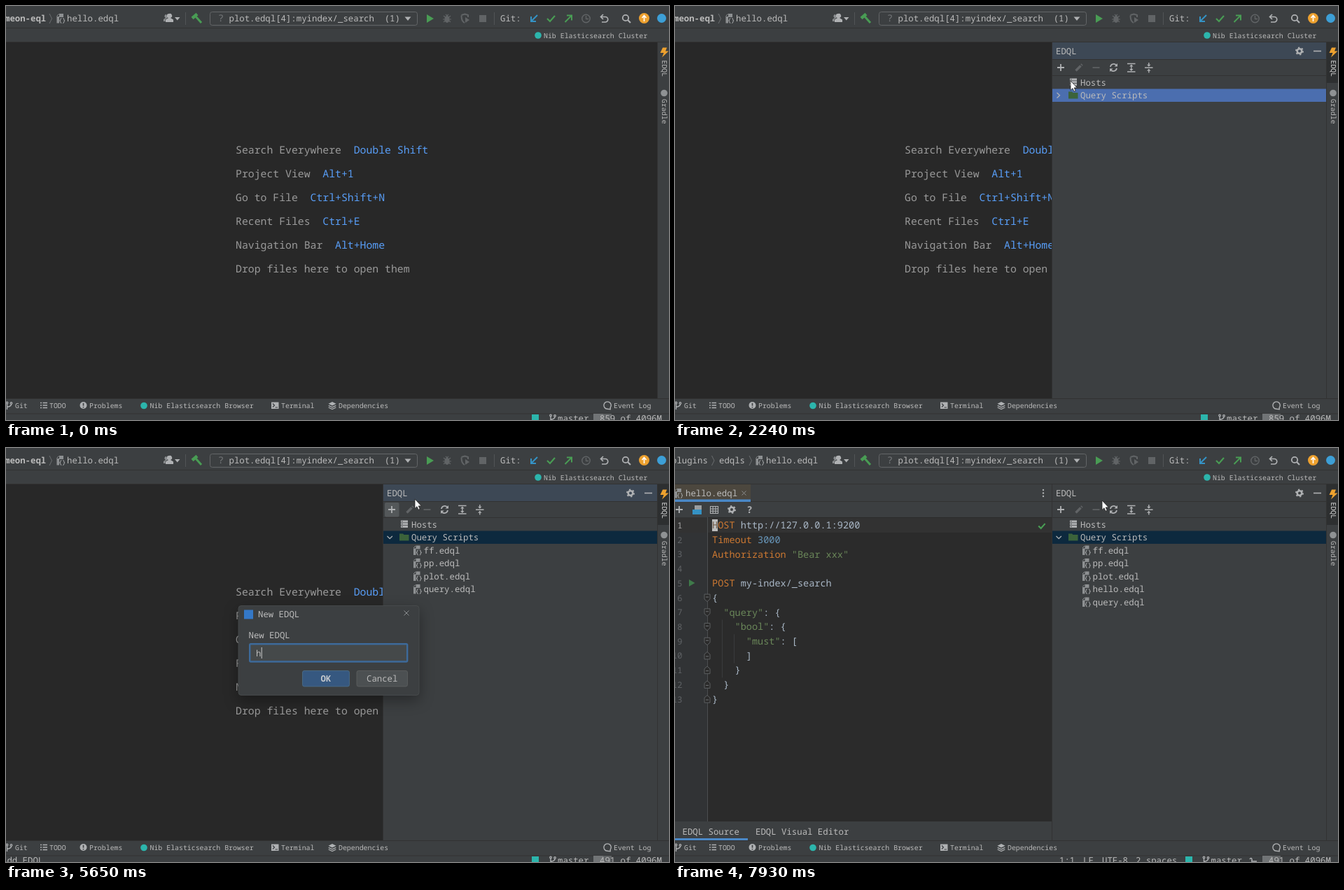
Write an HTML page that moves like this. It is 947 px wide and 592 px high and loops after 8 s.

```html
<!DOCTYPE html>
<html lang="en">
<head>
<meta charset="utf-8">
<title>EDQL tool window</title>
<style>
html, body { margin: 0; width: 100%; height: 100%; overflow: hidden; background: #3c3f41; }
svg { display: block; width: 100%; height: 100%; }
text { font-family: "Noto Sans Mono", "DejaVu Sans Mono", monospace; white-space: pre; text-rendering: geometricPrecision; }
#dialog { filter: drop-shadow(0 7px 10px rgba(0,0,0,.35)); }
</style>
</head>
<body>
<svg id="stage" viewBox="0 0 947 592" xmlns="http://www.w3.org/2000/svg"></svg>
<script>
const LOOP = 8000;
const BAR = '#3c3f41', LINE = '#323232', FG = '#bbbbbb', ICON = '#afb1b3', DIM = '#616466',
      GREEN = '#499c54', BLUE = '#3592c4', LINK = '#589df6', ACCENT = '#4a88c7', TEAL = '#2cb5ac';
const UI = 12.35, SMALL = 9.9, HINT = 14.8, CODE = 13.55;

const text = (x, y, s, fill = FG, size = UI, extra = '') =>
  `<text x="${x}" y="${y}" fill="${fill}" font-size="${size}" ${extra}>${s}</text>`;
const rect = (x, y, w, h, fill, extra = '') =>
  `<rect x="${x}" y="${y}" width="${w}" height="${h}" fill="${fill}" ${extra}/>`;
const fillPath = (d, fill = ICON) => `<path d="${d}" fill="${fill}"/>`;
const line = (d, color = ICON, w = 1.5) => `<path d="${d}" fill="none" stroke="${color}" stroke-width="${w}"/>`;
const dot = (x, y, r, fill, extra = '') => `<circle cx="${x}" cy="${y}" r="${r}" fill="${fill}" ${extra}/>`;
const ring = (x, y, r, color = ICON, w = 1.5) => dot(x, y, r, 'none', `stroke="${color}" stroke-width="${w}"`);
const group = (id, ...parts) => `<g id="${id}">${parts.join('')}</g>`;
const at = (x, y, ...parts) => `<g transform="translate(${x} ${y})">${parts.join('')}</g>`;

const plus = (x, y, c = ICON) => line(`M${x - 5} ${y}h10M${x} ${y - 5}v10`, c, 1.8);
const cross = (x, y, r = 3.5) => line(`M${x - r} ${y - r}l${2 * r} ${2 * r}m0 ${-2 * r}l${-2 * r} ${2 * r}`, '#8c8f91', 1);
const check = (x, y, s = 1) => line(`M${x - 5 * s} ${y}l${4 * s} ${4 * s}l${7 * s} ${-8 * s}`, GREEN, 2.2);
const crumb = x => line(`M${x} 11l3.5 7l-3.5 7`, '#6b6e70', 1);
const gear = (x, y) => ring(x, y, 3.3, ICON, 2.6) +
  `<circle cx="${x}" cy="${y}" r="5" fill="none" stroke="${ICON}" stroke-width="2" stroke-dasharray="2.2 3.036"/>`;
const branch = (x, y) => ring(x, y - 3.5, 1.3, ICON, 1.2) + ring(x + 6, y - 3, 1.3, ICON, 1.2) +
  line(`M${x} ${y - 2}v8M${x + 6} ${y - 1.5}q0 3 -6 4`, ICON, 1.4);
const file = (x, y) => at(x, y,
  fillPath('M4 0H10V5H4V13.500H0.500V4H4Z', '#8d9092'), line('M0.500 3.500l3 -3', '#8d9092', 1),
  line('M7.300 6.500q-1.500 0 -1.500 1.900t-1.200 1.600q1.200 0 1.200 1.700t1.500 1.900M9.300 6.500q1.500 0 1.500 1.900t1.200 1.600q-1.200 0 -1.200 1.700t-1.500 1.900', ICON, 1));
const branchLabel = (x, lock) => branch(x, 589) + text(x + 10, 594, 'master') +
  (lock ? line('M824 591v-3q-1 -3 -3 0M823 591h8', ICON, 1.5) : '');

function topBar() {
  return [
    rect(0, 0, 947, 592, BAR), rect(0, 31, 947, 1, LINE), rect(0, 51, 947, 1, LINE),
    at(225, 11, fillPath('M8 0a3 3 0 0 1 2 6l4 2.500v3.500H3v-3.500l4 -2.500a3 3 0 0 1 1 -6Z'),
      fillPath('M4 1a2.600 2.600 0 0 0 -1 5l-3 2v3h2.500v-3l3 -2Z', '#8b8e90')),
    fillPath('M241 16h7.500l-3.750 4.500Z'),
    rect(256, 9, 1, 18, '#515456'), rect(697, 9, 1, 18, '#515456'),
    line('M271 15l8 9', GREEN, 3), line('M266 17.500l7 -6', GREEN, 4.5),
    rect(291.5, 8.5, 296, 19, BAR, 'rx="3" stroke="#646668"'),
    text(303, 22, '?', '#777a7c', UI + 1), text(318.5, 22, 'plot.edql[4]:myindex/_search  (1)'),
    fillPath('M569.500 15.500h9l-4.500 5.500Z'),
    fillPath('M601 12l10 6l-10 6Z', GREEN),
    `<ellipse cx="630" cy="19" rx="3.6" ry="5" fill="${DIM}"/>`,
    line('M625 14l10 9M635 14l-10 9M624 19h12M628 12l2 2l2 -2', DIM, 1.2),
    line('M650.500 13l5 -1.500l4.500 1.500v3M655 24q-4.500 -2 -4.500 -10.500', DIM, 2),
    fillPath('M656 16l6 4l-6 4Z', DIM), rect(676, 13, 10, 10, DIM),
    text(706, 22, 'Git:'),
    line('M759 13l-8.500 8.500M750 15v7h7', BLUE, 2), check(778, 18),
    line('M798.500 23l9 -9M801 13.500h7v7', GREEN, 2),
    ring(828.5, 18, 5.7, DIM), line('M828.500 14v4.500h3.500', DIM, 1.3),
    line('M853 12l-3.500 3.500l3.500 3.500M850 15.500h6a3.700 3.700 0 0 1 0 7.500h-5', ICON, 1.7),
    ring(885, 17, 4.2, ICON, 1.8), line('M888 20l4 4', ICON, 2.2),
    dot(911.5, 17.5, 7.5, '#eda12f'), line('M911.500 22v-8M908.500 17l3 -3.500l3 3.500', '#fff', 1.6),
    dot(936.5, 17.5, 6.5, '#3d9fd6'),
    dot(760, 42, 4.8, TEAL), text(768, 45.5, 'Nib Elasticsearch Cluster', FG, SMALL)
  ].join('');
}

const crumbs = group('crumbsA', text(-2, 22, 'meon-eql', FG, UI, 'font-weight="700"'), crumb(62), file(72, 11), text(87, 22, 'hello.edql')) +
  group('crumbsB', text(-5, 22, 'plugins'), crumb(52.5), text(63, 22, 'edqls'), crumb(106), file(115, 11), text(130, 22, 'hello.edql'));

function hints() {
  const rows = [['Search Everywhere', 'Double Shift'], ['Project View', 'Alt+1'], ['Go to File', 'Ctrl+Shift+N'],
    ['Recent Files', 'Ctrl+E'], ['Navigation Bar', 'Alt+Home'], ['Drop files here to open them', '']];
  return rect(0, 52, 930, 509, '#282828') + rows.map(([label, key], i) =>
    text(328, 211 + 34 * i, `${label}  <tspan fill="${LINK}">${key}</tspan>`, '#9a9a9a', HINT)).join('');
}

function editor() {
  const k = s => `<tspan fill="#cc7832">${s}</tspan>`, q = s => `<tspan fill="#6a8759">"${s}"</tspan>`;
  const code = [k('HOST') + ' http://127.0.0.1:9200', k('Timeout') + ' <tspan fill="#6897bb">3000</tspan>',
    k('Authorization') + ' ' + q('Bear xxx'), '', k('POST') + ' my-index/_search', '{', `  ${q('query')}: {`,
    `    ${q('bool')}: {`, `      ${q('must')}: [`, '      ]', '    }', '  }', '}'];
  const mid = i => 110.5 + 20.72 * i;
  const fold = i => {
    const y = mid(i), s = i < 9 ? 1 : -1;
    return `<path d="M42 ${y - 5 * s}h8v${7 * s}l-4 ${3.5 * s}l-4 ${-3.5 * s}Z" fill="#2b2b2b" stroke="#5c5f61"/>` +
      line(`M44 ${y - s}h4`, '#707375', 1);
  };
  const guide = (x, a, b) => rect(x, mid(a) - 10, 1, (b - a + 1) * 20.72, '#393b3c');
  return [
    rect(0, 52, 538, 509, BAR), rect(0, 52, 108, 25, '#4c473e'), rect(0, 73.5, 108, 3.5, ACCENT),
    file(-1, 58), text(15, 69, 'hello.edql'), cross(98.5, 64.5, 3),
    dot(526, 60, 1.2, ICON), dot(526, 64.5, 1.2, ICON), dot(526, 69, 1.2, ICON),
    rect(108, 76, 430, 1, LINE), plus(6, 88),
    rect(28, 82, 10, 8, '#9a9da0'), rect(25, 88, 13, 7, BLUE),
    line('M50.500 83.500h11v10h-11ZM50 87h12M50 90.300h12M54.200 84v10M58 84v10', ICON, 1.1),
    gear(81, 88), text(102.5, 93, '?', ICON, 13.5, 'font-weight="700"'),
    rect(0, 99, 538, 435, '#2b2b2b'), rect(0, 99, 46, 435, '#313335'), rect(0, 100, 538, 21, '#323232'),
    rect(46, 99, 1, 435, '#4b4e50'),
    guide(67, 7, 10), guide(84, 8, 9), guide(100, 9, 8),
    code.map((c, i) => text(10.5, mid(i) + 4.5, i + 1, i ? '#606366' : '#a4a3a3', 12, 'text-anchor="end"') +
      text(53, mid(i) + 4.7, c, '#a9b7c6', CODE)).join(''),
    rect(53, 102, 8, 17, '#bdbdbd'), text(53, 115.2, 'H', '#6f5b48', CODE),
    group('marks', [5, 6, 7, 8, 9, 10, 11, 12].map(fold).join(''), fillPath('M20 188l8.500 5l-8.500 5Z', '#3f7a4a')),
    group('passed', check(523.5, 111.5, .85)),
    text(10.5, 552.5, 'EDQL Source'), text(115, 552.5, 'EDQL Visual Editor'), rect(0, 558, 104, 3, ACCENT)
  ].join('');
}

function panel() {
  const row = (y, name) => file(581.5, y - 7) + text(596.5, y + 4.2, name);
  return [
    rect(538, 52, 392, 509, BAR), rect(538, 52, 1, 509, LINE),
    `<rect id="head" x="539" y="52" width="391" height="24"/>`,
    rect(539, 76, 391, 1, LINE), rect(539, 99, 391, 1, LINE),
    text(544, 68.5, 'EDQL'), gear(892, 64.5), rect(912, 63.7, 11, 1.6, ICON),
    group('hover', rect(541, 78, 20.5, 20.5, '#54585a', 'rx="2"')), plus(551, 88),
    line('M572.500 92.500l7 -7', DIM, 3.4), line('M580.500 84.500l1 -1', DIM, 3.4), rect(596.5, 87.3, 10, 1.6, DIM),
    line('M621.800 87a5 5 0 0 1 9 -2M631 89a5 5 0 0 1 -9 2', ICON, 1.7), fillPath('M632 82v4.500h-4.500ZM621 94v-4.500h4.500Z'),
    line('M646 82.500h11.500M646 94h11.500', ICON, 1.5), fillPath('M651.800 83.500l2.700 3h-5.400ZM651.800 93l2.700 -3h-5.400Z'), rect(651.1, 86, 1.4, 4, ICON),
    line('M671 88.200h11.500', ICON, 1.5), fillPath('M676.800 86.800l2.700 -3h-5.400ZM676.800 89.700l2.700 3h-5.400Z'),
    line('M676.800 81v3M676.800 92.500v3', ICON, 1.4),
    rect(564, 103.5, 10, 3, ICON), rect(564, 107.2, 10, 3, ICON), rect(564, 110.9, 10, 3, ICON),
    line('M565 105h1.500M565 108.700h1.500M565 112.400h1.500', BAR, 1), text(579, 113.5, 'Hosts'),
    `<rect id="sel" x="539" y="118.5" width="391" height="18.5"/>`,
    group('closed', line('M545.500 124l4 3.700l-4 3.700', ICON, 1.3)),
    group('opened', line('M544.500 126l3.700 3.700l3.700 -3.700', ICON, 1.3)),
    fillPath('M562 122.500h5l1.500 1.500h7v8.500h-13.500Z', '#3b633b'), text(579, 132, 'Query Scripts'),
    group('files', row(146.5, 'ff.edql'), row(165, 'pp.edql'), row(183.5, 'plot.edql'),
      group('newFile', row(202, 'hello.edql')), group('lastFile', row(202, 'query.edql')))
  ].join('');
}

function sideBar() {
  const label = (y, s, id) => `<text id="${id}" transform="translate(936.8 ${y}) rotate(90)" fill="${FG}" font-size="${SMALL}">${s}</text>`;
  return rect(930, 52, 17, 509, BAR) + rect(930, 52, 1, 509, LINE) +
    `<rect id="tab" x="931" y="52" width="16" height="58"/>` +
    fillPath('M938 59.500h6l-2 5h4.500l-9.500 9l2.500 -6.500h-5Z', '#eda12f') + label(77.5, 'EDQL', 'tabText') +
    dot(940, 124.5, 4.8, '#8f9294') + label(133, 'Gradle', 'gradleText');
}

function bottomBar() {
  const label = (x, s) => text(x, 575, s, FG, SMALL);
  return [
    rect(0, 561, 947, 31, BAR), rect(0, 561, 947, 1, LINE), rect(0, 582.5, 947, 1, LINE),
    branch(1.5, 571), label(13, 'Git'),
    line('M49 567.500h2M49 571h2M49 574.500h2M52.500 567.500h6.500M52.500 571h6.500M52.500 574.500h6.500', ICON, 1.6), label(62, 'TODO'),
    dot(110.5, 571, 5, ICON), line('M110.500 567.700v4M110.500 573v1.500', BAR, 1.6), label(119, 'Problems'),
    dot(197, 571.5, 4.8, TEAL), label(205.5, 'Nib Elasticsearch Browser'),
    rect(379, 566.5, 10.5, 9.5, ICON), line('M381 568.500l2.500 2.500l-2.500 2.500M384.500 574h3.500', BAR, 1.2), label(393, 'Terminal'),
    fillPath('M466 566l5.500 2.700l-5.500 2.700l-5.500 -2.700Z'),
    line('M460.700 571.300l5.300 2.600l5.300 -2.600M460.700 574l5.300 2.600l5.300 -2.600', ICON, 1.3), label(475, 'Dependencies'),
    line('M859 576.300a5.200 5.200 0 1 1 4.200 -2v2.500Z', ICON, 1.4), label(868, 'Event Log'),
    group('statusA', rect(751, 584, 10, 8, TEAL), branchLabel(778)),
    group('statusB', text(549, 594, '1:1'), text(583, 594, 'LF'), text(610, 594, 'UTF-8'), text(658, 594, '2 spaces'),
      rect(729, 584, 10, 8, TEAL), branchLabel(755.5, true)),
    rect(839, 583, 26, 9, '#606365'), rect(839, 583, 14, 9, '#717476'),
    `<text id="mem" x="848" y="594" fill="${FG}" font-size="${UI}"></text>`,
    group('tip', text(-6, 594, 'Add EDQL'))
  ].join('');
}

const dialog = [
  rect(332, 225.5, 258, 128, BAR, 'rx="4" stroke="#4b4e50" stroke-width=".8"'),
  rect(340, 231.5, 13, 13, '#3478c8'), text(360, 242, 'New EDQL'), cross(572, 236),
  text(346.5, 271.5, 'New EDQL'),
  rect(348.2, 280.2, 225, 25.3, '#45494a', 'rx="1.5" stroke="#3d6a9a" stroke-width="2.4"'),
  group('picked', rect(357, 285, 82.5, 16, '#4b6eaf')),
  `<text id="field" x="357" y="297.5" fill="${FG}" font-size="${UI}"></text>`,
  `<rect id="caret" y="285" width="1" height="16" fill="#c8c8c8"/>`,
  rect(423.5, 318.5, 67, 22.5, '#365880', 'rx="2.5" stroke="#4c708c" stroke-width=".8"'),
  text(449.5, 334, 'OK', '#c4c8cc', UI, 'font-weight="700"'),
  rect(501, 318.5, 72.5, 22.5, '#4c5052', 'rx="2.5" stroke="#5e6060" stroke-width=".8"'), text(515, 334, 'Cancel')
].join('');

const arrow = '<path d="M0 0V13.500L3 10.700L5 15.300L7.200 14.300L5.200 9.900H9.300Z" fill="#fff" stroke="#222" stroke-width=".8"/>';

document.getElementById('stage').innerHTML = topBar() + crumbs + hints() + group('editor', editor()) +
  group('panel', panel()) + sideBar() + bottomBar() + group('dialog', dialog) + group('cursor', arrow);

const el = id => document.getElementById(id);
const show = (id, on) => { el(id).style.display = on ? '' : 'none'; };
const last = (table, t) => table.reduce((hit, row) => row[0] <= t ? row : hit);

// time, x, y of the pointer; it moves in ticks between rows
const TICK = 70;
const moves = [
  [0, 960, 600], [70, 700, 587], [230, 786, 490], [380, 880, 335], [530, 927, 199], [610, 960, 130],
  [1270, 944, 84], [1340, 943, 75], [1540, 943, 75], [1820, 815, 124], [2240, 565, 107], [2320, 566, 110],
  [2440, 567, 115], [2570, 569, 133], [2970, 569, 133], [3430, 549, 82], [3640, 549, 82], [3910, 584, 73],
  [7870, 584, 73], [7930, 610, 75]
];
const jumps = [0, 610, 2320];
const typed = [[0, 'query1.edql'], [5650, 'h'], [5750, 'he'], [5880, 'hel'], [6040, 'hell'], [6260, 'hello']];
const blink = [[0, 1], [4190, 0], [4640, 1], [5170, 0], [5650, 1], [6790, 0]];
const fade = [[0, 0], [3640, .8], [3700, .92], [3770, 1], [7140, .55], [7210, .2], [7270, 0]];

function pointer(t) {
  const a = last(moves, t), b = moves[moves.indexOf(a) + 1];
  if (!b || jumps.includes(a[0])) return [a[1], a[2]];
  const p = Math.floor((t - a[0]) / TICK) * TICK / (b[0] - a[0]);
  return [a[1] + (b[1] - a[1]) * p, a[2] + (b[2] - a[2]) * p];
}

function render(t) {
  const open = t >= 1540, expanded = t >= 2970, done = t >= 7270;
  show('panel', open);
  show('closed', !expanded);
  show('opened', expanded);
  show('files', expanded);
  show('newFile', done);
  el('lastFile').setAttribute('transform', `translate(0 ${done ? 18.5 : 0})`);
  el('head').setAttribute('fill', t >= 1610 && !done ? '#3d4855' : BAR);
  el('sel').setAttribute('fill', t >= 1610 && t < 3640 ? '#4b6eaf' : '#0d293e');
  el('tab').setAttribute('fill', open ? '#2d2f30' : t >= 1270 ? '#37393b' : BAR);
  el('tabText').setAttribute('fill', open ? '#d6d6d6' : FG);
  show('hover', t >= 3360 && !done);
  show('tip', t >= 3430 && !done);
  show('editor', done);
  show('crumbsA', t < 7340);
  show('crumbsB', t >= 7340);
  show('statusA', t < 7340);
  show('statusB', t >= 7340);
  show('marks', t >= 7470);
  show('passed', t >= 7670);
  el('mem').textContent = (t < 3840 ? '859' : '491') + ' of 4096M';

  const alpha = last(fade, t)[1], word = last(typed, t)[1];
  show('dialog', alpha > 0);
  el('dialog').style.opacity = alpha;
  const s = t < 3700 ? .946 : t < 3770 ? .98 : t >= 7140 ? .97 : 1;
  el('dialog').setAttribute('transform', `translate(${406 * (1 - s)} ${263 * (1 - s)}) scale(${s})`);
  el('field').textContent = word;
  show('picked', t < 5650);
  show('caret', last(blink, t)[1]);
  el('caret').setAttribute('x', 357.3 + word.length * UI * .6);

  const [x, y] = pointer(t);
  el('cursor').setAttribute('transform', `translate(${x} ${y})`);
}

const start = performance.now();
function frame() {
  render((performance.now() - start) % LOOP);
  requestAnimationFrame(frame);
}
frame();
</script>
</body>
</html>
```
